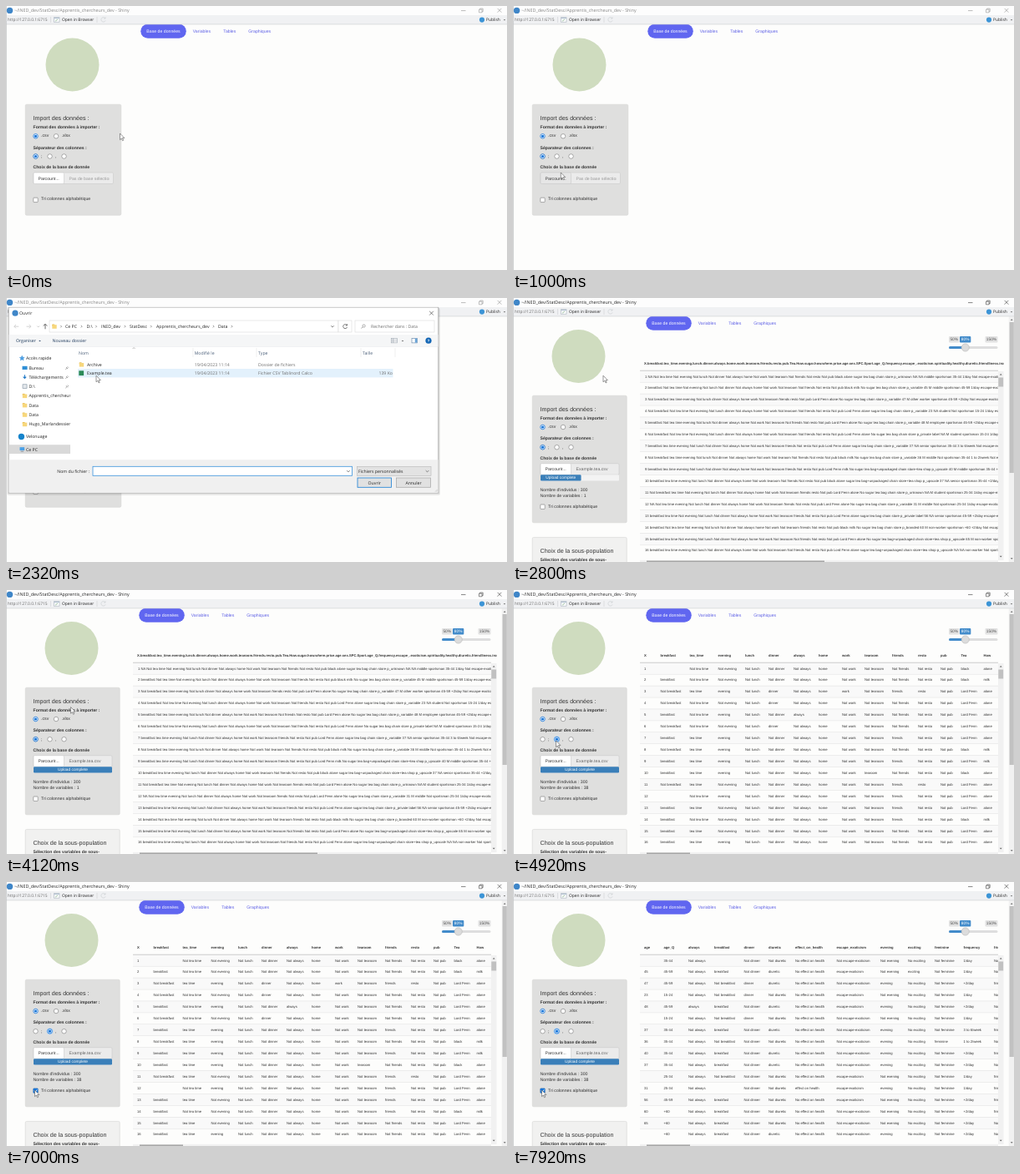
An HTML page that plays this animation: 600x317 px, repeating every 8 s.

```html
<!DOCTYPE html>
<html lang="fr">
<head>
<meta charset="utf-8">
<title>Apprentis chercheurs</title>
<style>
html,body{margin:0;width:100%;height:100%;overflow:hidden;background:#fdfdfc}
svg{display:block;width:100vw;height:100vh}
text{text-rendering:geometricPrecision;white-space:pre;fill:#333}
.u,.v{font-family:"Open Sans","Noto Sans",sans-serif;fill:#222}
.u{font-size:5.2px}
.v{font-size:4.9px}
.p,.b,.h,.t,.c,.s{font-family:"Liberation Sans",Arial,sans-serif}
.p{font-size:5.2px}
.b{font-size:5.15px;font-weight:700}
.h{font-size:7.13px}
.t{font-size:4.2px}
.c{font-size:4.15px;font-weight:700}
.s{font-size:4.8px}
</style>
</head>
<body>
<svg id="stage" viewBox="0 0 600 317" preserveAspectRatio="none"></svg>
<script>
const SIZE = {u: 5.2, v: 4.9, p: 5.2, b: 5.15, h: 7.13, t: 4.2, c: 4.15, s: 4.8};

// y is the middle of the line
const text = (k, x, y, str, extra = '') =>
  `<text class="${k}" x="${x}" y="${(y + SIZE[k] * .36).toFixed(2)}" ${extra}>${str}</text>`;
const tint = c => `style="fill:${c}"`;
const rect = (x, y, w, h, fill, extra = '') =>
  `<rect x="${x}" y="${y}" width="${w}" height="${h}" fill="${fill}" ${extra}/>`;
const disc = (x, y, r, fill, extra = '') =>
  `<circle cx="${x}" cy="${y}" r="${r}" fill="${fill}" ${extra}/>`;
const line = (d, c = '#555', w = .7, fill = 'none') =>
  `<path d="${d}" stroke="${c}" stroke-width="${w}" fill="${fill}"/>`;
const group = (id, body, extra = '') => `<g id="${id}" ${extra}>${body}</g>`;
const clip = (id, x, y, w, h) => `<clipPath id="${id}">${rect(x, y, w, h, '#000')}</clipPath>`;
const clipped = (id, body) => `<g clip-path="url(#${id})">${body}</g>`;
const tri = (x, y, s, c) => `<path d="M${x - s} ${y - s / 2}h${2 * s}l${-s} ${s}z" fill="${c}"/>`;
const triUp = (x, y, s, c) => `<path d="M${x - s} ${y + s / 2}h${2 * s}l${-s} ${-s}z" fill="${c}"/>`;
const down = (x, y) => line(`M${x - 1.8} ${y - .9}l1.8 1.8 1.8 -1.8`);
const cross = (x, y) => line(`M${x - 2.4} ${y - 2.4}l4.8 4.8m0 -4.8l-4.8 4.8`, '#333', .6);

function frameBar() {
  return rect(0, 0, 600, 11, '#fdfdfd') + rect(0, 11, 600, 11, '#f0f1f3') +
    rect(0, 21.6, 600, .7, '#cfd1d4') + rect(0, 0, .7, 317, '#c2c4c6') +
    disc(4.5, 5.4, 3.7, '#3f86c8') +
    group('caption', text('u', 10, 5.4, '~/INED_dev/StatDesc/Apprentis_chercheurs_dev - Shiny', 'style="font-size:5.35px"') +
      line('M545 5.6h5.5', '#333', .6) +
      line('M566.5 4.2h3.6v3.6h-3.6zM567.6 4.2v-1.1h3.6v3.6h-1.1', '#333', .55) + cross(591, 5.3)) +
    text('v', 2, 16.7, 'http://127.0.0.1:6715', tint('#666')) + line('M53.5 13v7M109 13v7', '#d0d2d5', .6) +
    rect(57.5, 13.8, 6.5, 5.4, '#fff', 'stroke="#a3aeb9" stroke-width=".6"') +
    rect(57.5, 13.8, 6.5, 1.4, '#b5c3d2') + line('M59 18.3l3 -2.4', '#86b08b', .8) +
    text('v', 67, 16.7, 'Open in Browser') +
    line('M118.8 14.8a2.7 2.7 0 1 0 .3 2.6M119 13.3v1.8h-1.8', '#d0d3d6', .8) +
    disc(570, 16.6, 3.1, '#3c94d6') + text('v', 575, 16.7, 'Publish') + tri(597, 16.8, 1.2, '#555');
}

function tabs(x) {
  return rect(x, 21.8, 54.5, 17, '#6066f0', 'rx="8.5"') +
    text('p', x + 7, 30, 'Base de données', tint('#fff')) +
    [[62.5, 'Variables'], [99, 'Tables'], [129, 'Graphiques']]
      .map(([d, s]) => text('p', x + d, 30, s, tint('#5e60e6'))).join('');
}

const ring = (x, y) => disc(x, y, 2.75, '#fff', 'stroke="#777" stroke-width=".6"');
const dot = (x, y) => disc(x, y, 2.75, '#fff', 'stroke="#1473d8" stroke-width=".8"') + disc(x, y, 1.6, '#1473d8');
const card = (y, w, h, fill = '#dfdfde') => rect(23.2, y, w, h, fill, 'rx="1.6" stroke="#d3d3d2" stroke-width=".6"');

// shared upper half of the side form
function form() {
  return text('h', 32.5, 133, 'Import des données :') +
    text('b', 32.5, 144.2, 'Format des données à importer :') +
    dot(35.5, 155) + text('p', 42, 154.2, '.csv') + ring(60, 155) + text('p', 66.5, 154.2, '.xlsx') +
    text('b', 32.5, 168.4, 'Séparateur des colonnes :') +
    [35.5, 52.5, 69.5].map(x => ring(x, 179.2)).join('') +
    text('p', 42, 179, ';') + text('p', 59, 179, ',') +
    text('b', 32.5, 192.2, 'Choix de la base de donnée');
}

function fileBox(id, w, label, color) {
  return rect(33, 198.7, w, 13.5, '#ebebeb', 'rx="1.4" stroke="#c9c9c9" stroke-width=".6"') +
    rect(33, 198.7, 36.5, 13.5, '#fff', `id="${id}" rx="1.4" stroke="#c9c9c9" stroke-width=".6"`) +
    text('p', 38.5, 205.5, 'Parcourir...') +
    clipped(id + 'Clip', text('p', 75.5, 205.5, label, tint(color)));
}

const checkbox = (x, y) => rect(x, y, 5.4, 5.4, '#fff', 'rx=".7" stroke="#777" stroke-width=".6"');

function pageBefore() {
  return disc(79.5, 70.5, 32, '#cfdcbf') + tabs(161.3) + card(118.2, 114.6, 133) +
    `<g transform="translate(0 1.3)">${form()}${dot(35.5, 179.2)}` +
    fileBox('browseA', 95.5, 'Pas de base sélectionnée', '#9a9a9a') + '</g>' +
    checkbox(32.8, 230.2) + text('p', 42, 231.6, 'Tri colonnes alphabétique');
}

function sidebarAfter() {
  return disc(78.5, 70, 32, '#cfdcbf') + tabs(159.3) + card(117.2, 113, 152.6) + form() +
    group('sepA', dot(35.5, 179.2)) +
    group('sepB', disc(52.5, 179.2, 3.8, '#a9cdf0') + dot(52.5, 179.2)) +
    fileBox('browseB', 94, 'Example.tea.csv', '#666') +
    rect(33, 212.2, 94, 7.2, '#f3f3f3', 'rx="1.2"') +
    rect(33, 212.2, 94, 7.2, '#3a7fb9', 'id="bar" rx="1.2"') +
    text('s', 80, 215.7, 'Upload complete', 'id="barText" text-anchor="middle" style="fill:#fff"') +
    text('p', 32.5, 230, "Nombre d'individus : 300") +
    text('p', 32.5, 237.3, 'Nombre de variables : 1', 'id="count"') +
    checkbox(32.8, 248) +
    group('tick', rect(32.6, 247.8, 5.8, 5.8, '#1473d8', 'rx=".8"') + line('M33.8 250.8l1.3 1.3 2.2 -2.8', '#fff', .9)) +
    text('p', 42, 250, 'Tri colonnes alphabétique') +
    card(287.4, 113, 40, '#f1f1f0') + text('h', 32.5, 303.2, 'Choix de la sous-population') +
    text('b', 32.5, 314.6, 'Sélection des variables de sous-');
}

function slider() {
  const tag = (x, w, s, bg, fg) => rect(x, 46, w, 7.4, bg, 'rx="1"') +
    text('s', x + w / 2, 49.7, s, `text-anchor="middle" style="fill:${fg}"`);
  return tag(522, 12.5, '50%', '#e2e2e2', '#555') + tag(535, 13.3, '80%', '#428bca', '#fff') +
    tag(565.5, 15, '150%', '#e2e2e2', '#555') +
    rect(522, 57.9, 58.5, 3.2, '#dedede', 'rx="1.6"') + rect(522, 57.9, 19, 3.2, '#428bca', 'rx="1.6"') +
    disc(541.7, 59.5, 4.6, '#dcdcdc', 'stroke="#b5b5b5" stroke-width=".6"');
}

// Table data: 1 = yes, 0 = "Not ...", - = missing
const WORDS = ['breakfast', 'tea time', 'evening', 'lunch', 'dinner', 'always', 'home', 'work', 'tearoom', 'friends', 'resto', 'pub'];
const FLAGS = ['-00000100000', '100000100000', '011010110110', '000010100000', '101001100000', '000010100000',
  '111000100100', '011000100000', '111000100100', '111000101000', '010000100110', '-01000100100',
  '110000100100', '100000100100', '110000100000', '111000100000'];
const TEA = 'BBEEEEEBEBEEEBEE', MILK = 'amaaaaammaaaamaa';
const AGE = [, 45, 47, 23, 48, , 37, 36, 40, 37, , 31, 56, 60, 65, ,];
const BAND = [2, 3, 3, 0, 3, 0, 2, 2, 2, 2, 1, 1, 3, 4, 4, 4].map(i => ['15-24', '25-34', '35-44', '45-59', '+60'][i]);
const FREQ = [0, 0, 1, 0, 1, 0, 2, 3, 1, 1, 0, 0, 1, 1, 1, 1].map(i => ['1/day', '+2/day', '3 to 6/week', '1 to 2/week'][i]);
const DIURETIC = '0110101011000001', ESCAPE = '0101100000111000';
const PRICE = ['unknown', 'variable', 'variable', 'variable', 'variable', 'private label', 'variable', 'variable',
  'upscale', 'upscale', 'unknown', 'variable', 'private label', 'branded', 'upscale', 'upscale'];
const JOB = ['middle', 'middle', 'other worker', 'student', 'employee', 'student', 'senior', 'middle',
  'middle', 'senior', 'student', 'middle', 'senior', 'non-worker', 'non-worker', 'non-worker'];

const rowY = i => 94 + 13.93 * i;
const yes = (f, w, no = 'Not') => f === '-' ? '' : f === '1' ? w : no + ' ' + w;
const word = (i, j) => yes(FLAGS[i][j], WORDS[j]);
const tea = i => TEA[i] === 'B' ? 'black' : 'Lord Fenn';
const how = i => MILK[i] === 'm' ? 'milk' : 'alone';
const exotic = i => yes(ESCAPE[i], 'escape-exoticism');

function rawRow(i) {
  const bulk = [8, 9, 14, 15].includes(i);
  return [i + 1, ...WORDS.map((w, j) => word(i, j) || 'NA'), tea(i), how(i), i % 3 ? 'No sugar' : 'sugar',
    bulk ? 'tea bag+unpackaged chain store+tea shop' : 'tea bag chain store', 'p_' + PRICE[i],
    AGE[i] || 'NA', i % 3 ? 'M' : 'NA', JOB[i], i % 4 === 3 ? 'Not sportsman' : 'sportsman',
    BAND[i], FREQ[i], exotic(i), 'spirituality'].join(' ');
}

const each = fn => FLAGS.map((f, i) => fn(i)).join('');
const thumb = w => rect(160, 315.4, w, 2, '#a8a8a8');

function rawTable() {
  const head = 'X.breakfast.tea_time.evening.lunch.dinner.always.home.work.tearoom.friends.resto.pub.Tea.How.sugar.how.where.price.age.sex.SPC.Sport.age_Q.frequency.escape_.exoticism.spirituality.healthy.diuretic.friendliness.iron';
  return clipped('headClip', text('c', 157, 79, head)) +
    clipped('gridClip', each(i => text('t', 158, rowY(i), rawRow(i)))) + thumb(213);
}

function columns(heads, xs, cell) {
  return clipped('gridClip', heads.map((h, j) => text('c', xs[j], 79, h)).join('') +
    each(i => xs.map((x, j) => text('t', x, rowY(i), cell(i, j))).join(''))) + thumb(52);
}

const splitTable = () => columns(
  ['X', ...WORDS.map(w => w.replace(' ', '_')), 'Tea', 'How'],
  [157, 176.5, 211.5, 245.5, 278, 306, 336, 366, 394, 421, 454, 485, 512, 536.5, 563.5],
  (i, j) => j === 0 ? i + 1 : j < 13 ? word(i, j - 1) : j === 13 ? tea(i) : how(i));

const sortedTable = () => columns(
  ['age', 'age_Q', 'always', 'breakfast', 'dinner', 'diuretic', 'effect_on_health', 'escape_exoticism',
    'evening', 'exciting', 'feminine', 'frequency', 'friends'],
  [157, 180.5, 210, 241, 276.5, 306, 338, 387.5, 440, 473, 505, 539.5, 576],
  (i, j) => [AGE[i] || '', BAND[i], word(i, 5), word(i, 0), word(i, 4), yes(DIURETIC[i], 'diuretic'),
    yes(i === 11 ? '1' : '0', 'effect on health', 'No'), exotic(i), word(i, 2),
    yes(i === 1 ? '1' : '0', 'exciting', 'No'), yes(i === 7 ? '1' : '0', 'feminine'), FREQ[i], word(i, 9)][j]);

function tableFrame() {
  return each(i => rect(152, rowY(i) - 7, 429, 13.93, i % 2 ? '#fdfdfc' : '#f9f9f9') +
      rect(152, rowY(i) - 7, 429, .5, '#dcdcdc')) +
    rect(152, 86.8, 429, .6, '#bbb') +
    rect(581, 88, 6.5, 227, '#f1f1f1') + rect(581.3, 95.5, 5.9, 11, '#c1c1c1') +
    triUp(584.2, 91.8, 1.4, '#555') + tri(584.2, 310.5, 1.4, '#555') +
    rect(152, 314.8, 429, 3, '#f1f1f1') +
    rect(593.8, 22.3, 6.2, 295, '#f1f1f1') + rect(594.6, 29, 5.2, 181, '#c1c1c1') +
    triUp(597.2, 26, 1.4, '#555') + tri(597.2, 313, 1.4, '#555');
}

const folder = (x, y) => rect(x, y - 2.6, 2.8, 2, '#e2b23e') + rect(x, y - 2, 5.4, 4.6, '#f7d77c');
const pin = y => line(`M71.4 ${y + 1.8}l1.6 -1.6m-.9 -1.2l2 2m-.4 -2.6l1.2 1.2`, '#777', .7);

function dialog() {
  const crumbs = [[71, 'Ce PC'], [96.5, 'D:\\'], [114, 'INED_dev'], [148, 'StatDesc'], [180, 'Apprentis_chercheurs_dev'], [254, 'Data']];
  const places = [[84, 'Bureau'], [95, 'Téléchargements'], [106.3, 'D:\\'], [117.5, 'Apprentis_chercheurs_dev'],
    [128.8, 'Data'], [140.2, 'Data'], [151.6, 'Hugo_Marlandessier']];
  const gray = tint('#6d6d6d'), navy = tint('#1e395b'), slate = tint('#4c607a');
  const button = (x, w, s, edge) => rect(x, 216, w, 11.3, '#e1e1e1', `stroke="${edge}" stroke-width=".8"`) +
    text('u', x + w / 2, 221.7, s, 'text-anchor="middle"');
  const box = (x, w) => rect(x, 27, w, 14, '#fff', 'stroke="#d9d9d9" stroke-width=".6"');
  const file = (y, name, type) => text('u', 97, y, name) + text('u', 225.7, y, '19/04/2023 11:14', gray) + text('u', 302, y, type, gray);

  return rect(1.5, 12, 518.5, 225, '#000', 'opacity=".07" rx="2"') + rect(2.3, 11.5, 516.8, 223.8, '#000', 'opacity=".1"') +
    rect(3.2, 11.2, 514.5, 222.8, '#fff', 'stroke="#a9a9a9" stroke-width=".6"') +
    disc(11, 18.2, 3.6, '#3f86c8') + text('u', 16, 18.3, 'Ouvrir') + cross(509.5, 18.2) +
    line('M15.2 34.2h-5.4m2.2 -2.2l-2.2 2.2 2.2 2.2M24.5 34.2h5.4m-2.2 -2.2l2.2 2.2 -2.2 2.2', '#c9c9c9', .8) +
    line('M37.3 33.6l1.4 1.4 1.4 -1.4', '#aaa', .6) + line('M47 37.3v-6m-2.3 2.3l2.3 -2.3 2.3 2.3', '#444', .8) +
    box(52, 346) + box(398, 16) + box(418, 95) + folder(55.3, 34.2) +
    crumbs.map(([x, s]) => text('u', x, 34.2, s)).join('') +
    [66, 90.5, 108, 142.5, 173.8, 248.5, 270.5].map(x => line(`M${x - .7} 32.9l1.3 1.3 -1.3 1.3`, '#555', .6)).join('') +
    down(391, 34.2) + line('M408.2 32.6a2.5 2.5 0 1 0 .4 2.3M408.5 31.2v1.8h-1.8', '#444', .7) +
    disc(428.6, 33.5, 1.6, 'none', 'stroke="#777" stroke-width=".6"') + line('M427.4 34.7l-1.8 1.8', '#777') +
    text('u', 437, 34.2, 'Rechercher dans : Data', gray) +
    rect(3.6, 44, 513.8, 14.3, '#f5f6f7') + rect(3.6, 58.2, 513.8, .5, '#e3e5e8') +
    text('u', 12, 51.2, 'Organiser', navy) + tri(40.5, 51.6, 1.3, '#1e395b') +
    text('u', 55.5, 51.2, 'Nouveau dossier', navy) +
    rect(461.5, 48.3, 6.8, 5.6, '#fff', 'stroke="#8c97a3" stroke-width=".5"') + line('M461.5 50.2h6.8m-6.8 1.9h6.8m-4.6 -3.8v5.6', '#8c97a3', .5) +
    tri(475, 51.6, 1.3, '#555') +
    rect(486, 48.3, 6.6, 5.6, '#fff', 'stroke="#5b7ea3" stroke-width=".6"') + rect(489.8, 48.6, 2.6, 5, '#6aa5d8') +
    disc(506, 51.2, 3.6, '#1366b5') + text('s', 506, 51.2, '?', 'text-anchor="middle" style="fill:#fff;font-weight:700"') +
    line('M224 60v11M300 60v11M425 60v11M466 60v11', '#e5e5e5', .6) + line('M151.6 61l1.5 -1.5 1.5 1.5', '#777', .5) +
    [[87, 'Nom'], [225.7, 'Modifié le'], [302, 'Type'], [427, 'Taille']].map(([x, s]) => text('u', x, 65.8, s, slate)).join('') +
    rect(86, 85, 377.5, 10.4, '#e3f1fc', 'id="hover"') +
    folder(87.8, 80) + file(80, 'Archive', 'Dossier de fichiers') +
    rect(87.3, 87.3, 5.8, 5.8, '#2b8a57') + file(90.3, 'Example.tea', 'Fichier CSV Tablinord Calco') +
    text('u', 463, 90.3, '139 Ko', 'text-anchor="end" style="fill:#6d6d6d"') +
    rect(3.6, 176.2, 73.4, 10.8, '#d9d9d9') +
    line('M19.2 69.2l.9 2 2.1 .2 -1.6 1.4 .5 2.1 -1.9 -1.1 -1.9 1.1 .5 -2.1 -1.6 -1.4 2.1 -.2z', '#2f86d2', .4, '#4aa0e6') +
    text('u', 24, 72.5, 'Accès rapide') +
    rect(19.5, 81.8, 6, 4.2, '#2f8fd6') + line('M22.4 92.2v4.2m-1.8 -1.8l1.8 1.8 1.8 -1.8', '#2079c7', 1.1) +
    rect(20, 103.8, 5, 4.6, '#e4e8ec', 'stroke="#7f8fa0" stroke-width=".6"') +
    places.slice(3).map(([y]) => folder(19.8, y)).join('') +
    clipped('navClip', places.map(([y, s]) => text('u', 27.5, y, s)).join('')) +
    places.slice(0, 3).map(([y]) => pin(y)).join('') +
    disc(18.4, 166.5, 3.7, '#1583cb') + text('u', 24, 166.6, 'Velonuage') +
    rect(16.5, 179.2, 5.6, 3.8, '#4aa0e6') + line('M17.6 184.2h3.6', '#60758a') + text('u', 24, 181.7, 'Ce PC') +
    rect(3.6, 194.2, 513.8, 39.5, '#f0f0f0') +
    text('u', 61.3, 208, 'Nom du fichier :') +
    rect(104, 202.3, 310.5, 11, '#fff', 'stroke="#3b93dc" stroke-width=".8"') + down(410, 208) +
    rect(420.5, 202.3, 88.5, 11, '#e3e3e3', 'stroke="#b8b8b8" stroke-width=".6"') + down(504.5, 208) +
    text('u', 422, 208, 'Fichiers personnalisés') +
    button(421, 40.5, 'Ouvrir', '#1a7fd4') + button(467.5, 41, 'Annuler', '#adadad') +
    line('M514 232.6l2.6 -2.6m-1 2.6l1 -1', '#aaa', .5);
}

const pointer = '<path id="cursor" d="M0 0v7.6l1.8 -1.6 1.2 2.7 1.2 -.5 -1.2 -2.7h2.4z" fill="#fff" stroke="#555" stroke-width=".6"/>';

const $ = id => document.getElementById(id);
$('stage').innerHTML =
  `<defs>${clip('browseAClip', 70, 198, 53.5, 15)}${clip('browseBClip', 70, 198, 56, 15)}` +
  clip('headClip', 152, 70, 436, 17) + clip('gridClip', 152, 70, 429, 244.8) + clip('navClip', 4, 60, 73.3, 130) + '</defs>' +
  rect(0, 0, 600, 317, '#fdfdfc') +
  group('before', pageBefore()) +
  group('after', sidebarAfter() + slider() + tableFrame() +
    group('raw', rawTable()) + group('split', splitTable()) + group('sorted', sortedTable())) +
  frameBar() + group('dialog', dialog()) + pointer;

const show = (id, on) => $(id).setAttribute('visibility', on ? 'inherit' : 'hidden');
const clamp = v => Math.max(0, Math.min(1, v));
const ease = p => p * p * (3 - 2 * p);

const PATH = [[0, 136.5, 153], [160, 136.5, 153], [900, 57.3, 200], [1720, 57.3, 200], [2260, 108, 93.2],
  [3720, 108, 93.2], [4480, 51.5, 181], [5520, 51.5, 181], [6300, 34.5, 250], [8000, 34.5, 250]];

function cursorAt(t) {
  const i = PATH.findIndex((p, k) => k && t <= p[0]);
  const [a, b] = [PATH[i - 1], PATH[i]];
  const p = ease((t - a[0]) / (b[0] - a[0]));
  return [1, 2].map(k => a[k] + (b[k] - a[k]) * p);
}

// the screen refreshes about ten times a second, alternating 120 and 80 ms
function snap(t) {
  let k = Math.floor(t / 100);
  if (k % 2 && t < k * 100 + 20) k--;
  return k * 100 + k % 2 * 20;
}

function draw(t) {
  const loaded = t >= 2720, split = t >= 4720, sorted = t >= 7320;
  show('before', !loaded);
  show('after', loaded);
  show('raw', loaded && !split);
  show('split', split && !sorted);
  show('sorted', sorted);
  show('sepA', loaded && t < 4600);
  show('sepB', t >= 4600);
  show('tick', t >= 6720);
  show('hover', t >= 2200);
  $('count').textContent = 'Nombre de variables : ' + (split ? 38 : 1);
  $('browseA').setAttribute('fill', t >= 820 ? '#e6e6e6' : '#fff');

  const bar = 94 * clamp((t - 2490) / 600);
  $('bar').setAttribute('width', bar);
  $('barText').setAttribute('x', 33 + bar / 2);

  const rise = 1 - (1 - clamp((t - 1360) / 220)) ** 2;
  const seen = rise * (1 - clamp((t - 2500) / 120));
  const scale = .92 + .08 * seen;
  show('dialog', seen > 0);
  $('dialog').setAttribute('opacity', seen);
  $('dialog').setAttribute('transform', `translate(260.5 122.5) scale(${scale}) translate(-260.5 -122.5)`);
  // the window has no focus until the dialog has closed
  $('caption').setAttribute('opacity', t >= 2620 ? 1 : .55);

  $('cursor').setAttribute('transform', `translate(${cursorAt(t)})`);
}

const start = performance.now();
let last = -1;
function tick() {
  const t = snap((performance.now() - start) % 8000);
  if (t !== last) draw(last = t);
  requestAnimationFrame(tick);
}
tick();
</script>
</body>
</html>
```
